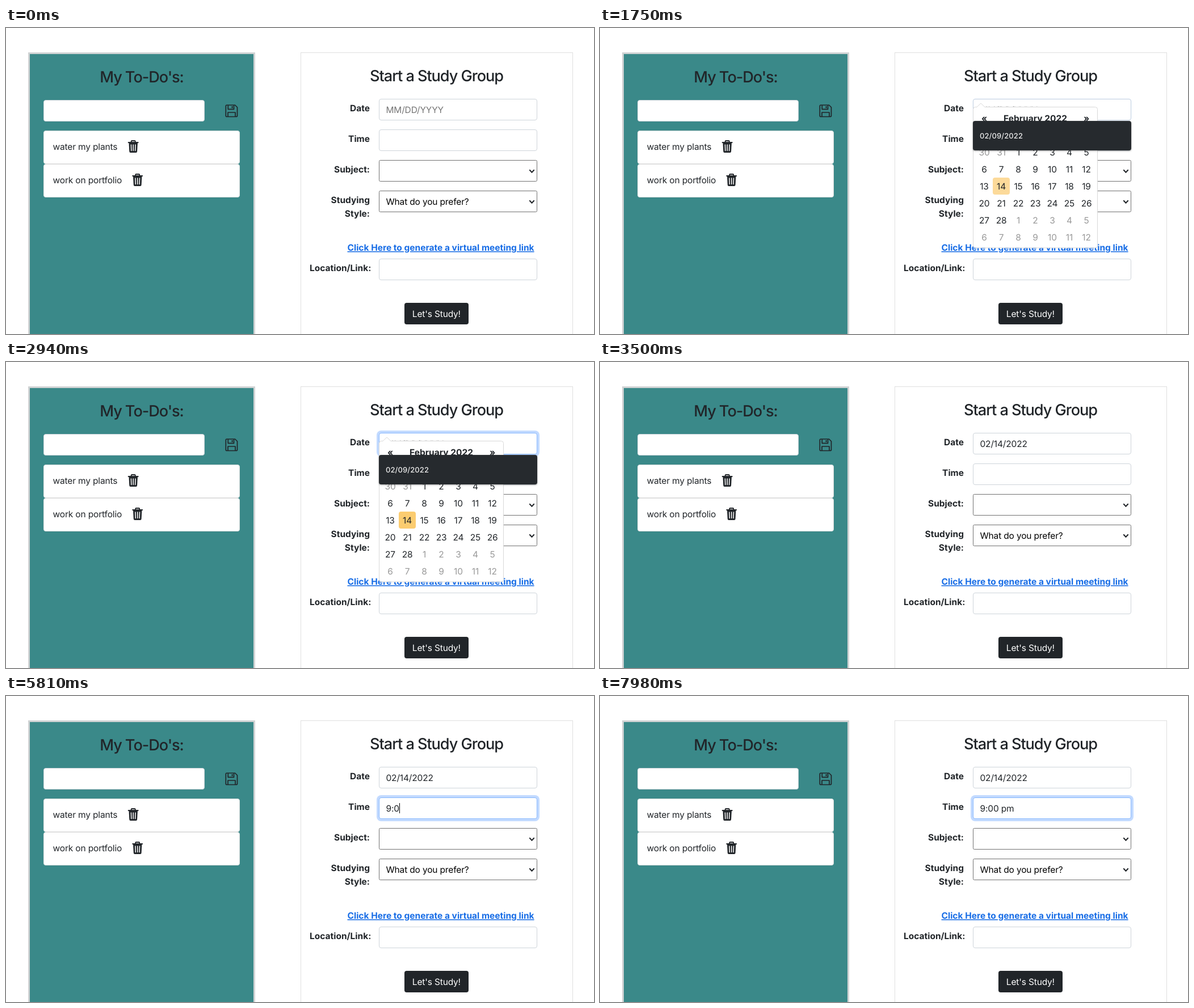
An HTML page that plays this animation: 1036 px wide and 540 px high, repeating every 8000 ms.

```html
<!DOCTYPE html>
<html lang="en">
<head>
<meta charset="utf-8">
<title>Study planner</title>
<style>
  html, body { margin: 0; width: 100%; height: 100%; overflow: hidden; background: #fff; }
  svg { display: block; width: 1036px; height: 540px; }
  text {
    font: 400 15.5px Inter, Roboto, sans-serif;
    font-optical-sizing: none;
    letter-spacing: -.16px;
    fill: #212529;
    text-rendering: geometricPrecision;
    white-space: pre;
  }
  .title { font-size: 27.2px; font-weight: 500; letter-spacing: -1.08px; text-anchor: middle; }
  .bold { font-weight: 700; letter-spacing: 0; }
  .label { text-anchor: end; }
  .mid { text-anchor: middle; }
  .link { fill: #186de6; text-decoration: underline; }
  .hint { fill: #757575; }
  .dim { fill: #999; }
  .field { fill: #fff; stroke: #ced4da; }
  .select { fill: #fff; stroke: #717171; }
  .item { fill: #fff; stroke: #dfdfdf; }
  .line { fill: none; stroke: #212529; }
  .tip { font-size: 13px; font-weight: 500; letter-spacing: .1px; fill: #ededed; }
</style>
</head>
<body>
<svg viewBox="0 0 1036 540">
  <defs>
    <g id="trash">
      <path class="line" stroke-width="2" stroke-linecap="round" d="M1 4H18M6 3.5V2Q6 1 7 1H12Q13 1 13 2V3.5"/>
      <path fill="#212529" d="M1.8 5H17.2L16.4 20Q16.2 22 14.4 22H4.6Q2.8 22 2.6 20Z"/>
      <path stroke="#fff" stroke-width="1.5" stroke-linecap="round" d="M5.7 8L6.1 18.6M9.5 8V18.6M13.3 8L12.9 18.6"/>
    </g>
    <path id="chevron" class="line" stroke-width="2" d="M-4.2 -2.2L0 2.2L4.2 -2.2"/>
    <filter id="shade" x="-10%" y="-30%" width="120%" height="170%">
      <feDropShadow dx="0" dy="1" stdDeviation="1.5" flood-opacity=".35"/>
    </filter>
  </defs>

  <rect x="40.5" y="44.5" width="397" height="520" fill="#3a8989" stroke="#d0d3d4" stroke-width="3"/>
  <text class="title" x="239" y="96">My To-Do's:</text>
  <rect class="field" x="66.5" y="127.5" width="283" height="37" rx="3.5"/>
  <g class="line" stroke-width="1.7" stroke-linejoin="round">
    <path d="M389 136H403.5L407.5 140V154.5Q407.5 156.5 405.5 156.5H389Q387.3 156.5 387.3 154.5V138Q387.3 136 389 136Z"/>
    <path d="M391.3 136.5V143.3H401.5V136.5M391 156V149H404V156"/>
    <path d="M398.6 138V141.3" stroke-width="2"/>
  </g>
  <rect class="item" x="66.5" y="181.5" width="345" height="58" rx="3.5"/>
  <rect class="item" x="66.5" y="240.5" width="345" height="58" rx="3.5"/>
  <text x="82.5" y="215">water my plants</text>
  <text x="82.5" y="274">work on portfolio</text>
  <use href="#trash" x="214.7" y="198"/>
  <use href="#trash" x="222.2" y="257"/>

  <rect x="519.5" y="43.5" width="479" height="520" fill="#fff" stroke="#dfdfdf"/>
  <text class="title" x="758.5" y="94">Start a Study Group</text>
  <g class="bold">
    <text class="bold label" x="641" y="147">Date</text>
    <text class="bold label" x="641" y="201">Time</text>
    <text class="bold label" x="641" y="255">Subject:</text>
    <text class="bold label" x="641" y="309">Studying</text>
    <text class="bold label" x="641" y="333">Style:</text>
    <text class="bold" x="535" y="429">Location/Link:</text>
  </g>
  <text class="bold link" x="601.5" y="393">Click Here to generate a virtual meeting link</text>

  <rect id="dateRing"/>
  <rect id="dateBox" class="field" x="657.5" y="125.5" width="278" height="37" rx="3.5"/>
  <text id="date" x="669.5" y="150"></text>
  <rect id="timeRing"/>
  <rect id="timeBox" class="field" x="657.5" y="179.5" width="278" height="37" rx="3.5"/>
  <text id="time" x="669.5" y="204"></text>
  <rect id="caret" y="189" width="1" height="18" fill="#000"/>
  <rect class="select" x="657.5" y="233.5" width="278" height="37" rx="2"/>
  <rect class="select" x="657.5" y="287.5" width="278" height="37" rx="2"/>
  <use href="#chevron" x="926.5" y="252.5"/>
  <use href="#chevron" x="926.5" y="306.5"/>
  <text x="669.5" y="312" style="fill:#000">What do you prefer?</text>
  <rect class="field" x="657.5" y="407.5" width="278" height="37" rx="3.5"/>
  <rect x="702" y="485" width="113" height="38" rx="4" fill="#212529"/>
  <text class="mid" x="758.4" y="510" style="fill:#fff">Let's Study!</text>

  <g id="calendar">
    <path fill="#fff" stroke="#d9d9d9" d="M661.5 139.5H664L671 132.8L678 139.5H872.5Q876.5 139.5 876.5 143.5V384Q876.5 388 872.5 388H661.5Q657.5 388 657.5 384V143.5Q657.5 139.5 661.5 139.5Z"/>
    <rect id="today" x="692" y="264" width="30" height="30" rx="4"/>
  </g>
  <g id="tip">
    <rect x="657" y="164" width="279" height="52" rx="4" fill="#272b2e" filter="url(#shade)"/>
    <text class="tip" x="669" y="195">02/09/2022</text>
  </g>
</svg>
<script>
const LOOP = 8000, STEP = 70, FADE = 150;
const $ = id => document.getElementById(id);

// Calendar cells
function cell(str, x, y, cls) {
  const el = document.createElementNS('http://www.w3.org/2000/svg', 'text');
  el.setAttribute('class', 'mid ' + cls);
  el.setAttribute('x', x);
  el.setAttribute('y', y);
  el.textContent = str;
  $('calendar').append(el);
}
cell('«', 677, 165, 'bold');
cell('February 2022', 767, 165, 'bold');
cell('»', 857, 165, 'bold');
['Su', 'Mo', 'Tu', 'We', 'Th', 'Fr', 'Sa'].forEach((d, i) => cell(d, 677 + 30 * i, 195, 'bold'));
for (let i = 0; i < 42; i++) {
  const day = new Date(2022, 0, 30 + i);
  cell(day.getDate(), 677 + 30 * (i % 7), 225 + 30 * Math.floor(i / 7), day.getMonth() === 1 ? '' : 'dim');
}

// Moments in ms
const OPEN = 1750, HOVER = 2660, BLUR = 3080, PICK = 3150, TIME_FOCUS = 3640;
const typed = [[0, ''], [5110, '9'], [5390, '9:'], [5810, '9:0'], [6160, '9:00'],
               [6510, '9:00 '], [6790, '9:00 p'], [7140, '9:00 pm']];
const caretOn = [[3710, 4270], [4760, 7700]];

const ease = k => k * k * (3 - 2 * k);
const ramp = (t, start) => ease(Math.min(1, Math.max(0, (t - start) / FADE)));
const mix = (a, b, k) => a.map((v, i) => Math.round(v + (b[i] - v) * k));

function focus(name, y, k) {
  const spread = 4 * k, ring = $(name + 'Ring');
  const box = { x: 657 - spread, y: y - spread, width: 279 + 2 * spread, height: 38 + 2 * spread, rx: 4 + spread };
  for (const key in box) ring.setAttribute(key, box[key]);
  ring.style.fill = `rgba(13,110,253,${.25 * k})`;
  $(name + 'Box').style.stroke = `rgb(${mix([206, 212, 218], [134, 183, 254], k)})`;
}

function show(id, on) { $(id).style.display = on ? '' : 'none'; }

function draw(ms) {
  const t = Math.floor(ms / STEP) * STEP;
  focus('date', 125, ramp(t, OPEN - 40) * (1 - ramp(t, BLUR - 20)));
  focus('time', 179, ramp(t, TIME_FOCUS - 20));

  const picked = t >= PICK;
  $('date').textContent = picked ? '02/14/2022' : 'MM/DD/YYYY';
  $('date').setAttribute('class', picked ? '' : 'hint');
  show('calendar', t >= OPEN && !picked);
  show('tip', t >= OPEN && t < BLUR);
  $('today').style.fill = t >= HOVER ? '#fbcc70' : '#fcda9a';

  const value = typed.filter(([at]) => t >= at).pop()[1];
  $('time').textContent = value;
  const width = value ? $('time').getComputedTextLength() : 0;
  $('caret').setAttribute('x', Math.round(669.5 + width));
  show('caret', caretOn.some(([a, b]) => t >= a && t < b));
}

const begin = performance.now();
function tick() {
  draw((performance.now() - begin) % LOOP);
  requestAnimationFrame(tick);
}
tick();
</script>
</body>
</html>
```
